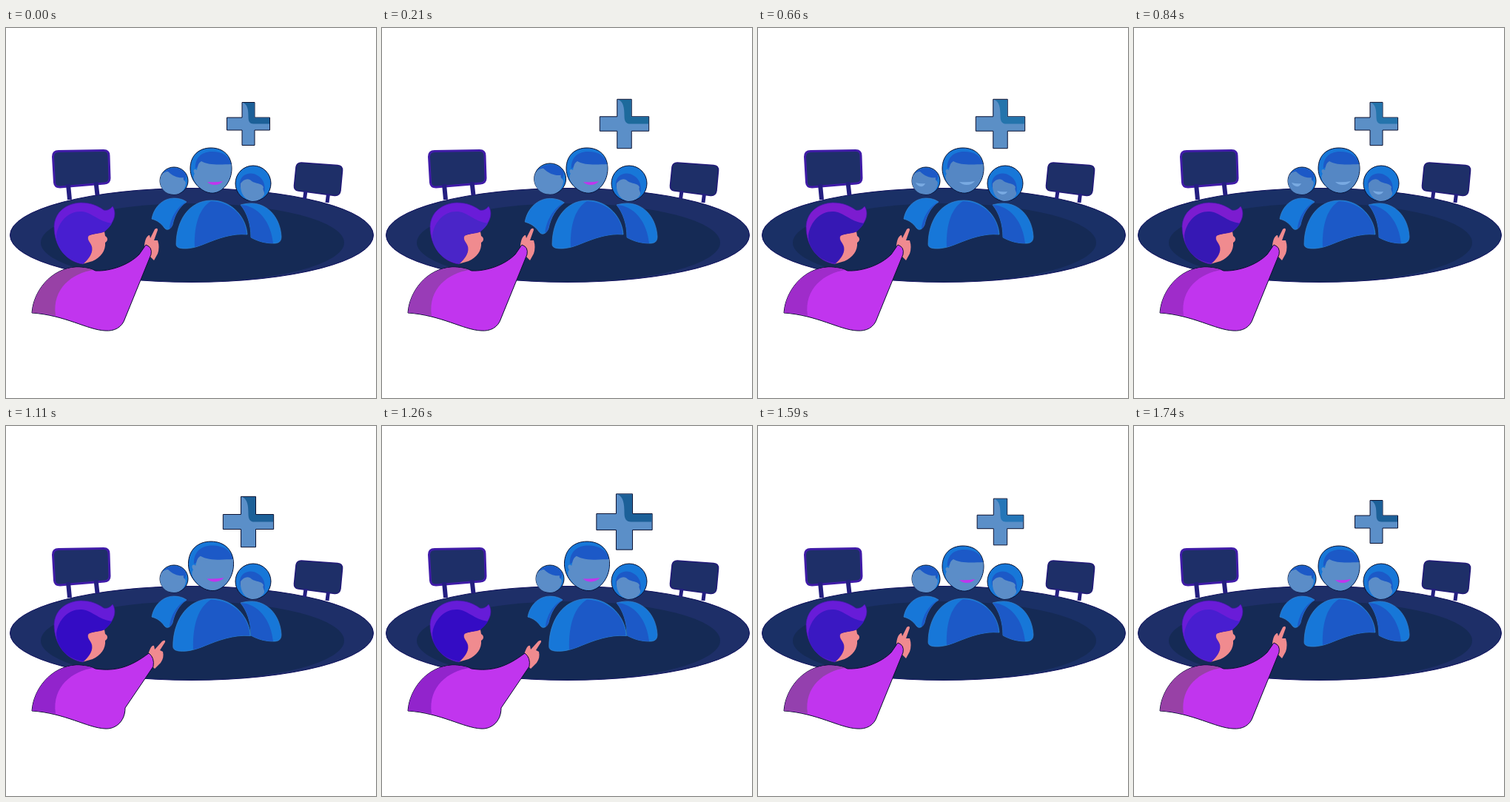
Recreate the animation shown at these times as an HTML page. Size 500 px wide and 500 px high, loop 1800 ms.

```html
<!DOCTYPE html>
<html lang="en">
<head>
<meta charset="utf-8">
<title>Team pointing loop</title>
<style>
html, body { margin: 0; width: 100%; height: 100%; overflow: hidden; background: #fff; }
svg { display: block; width: 100vw; height: 100vh; }
.edge { stroke: #0a1030; stroke-width: 1; vector-effect: non-scaling-stroke; }
.light { fill: #1777d8; }
.dark { fill: #1c59c7; }
.rim { stroke: #3488d4; stroke-width: .7; }
.face { fill: var(--face); }
.skin { fill: #f08b8f; }
.shirt { fill: #c135ee; }
.navy { fill: #1e2f68; }
.grin { fill: #79aae2; }
.board { stroke: #401ca8; stroke-width: 3; }
.leg { stroke: #241f80; stroke-width: 6; }
</style>
</head>
<body>
<svg viewBox="0 0 500 500">
  <ellipse cx="251" cy="280" rx="245.5" ry="63.5" fill="var(--table)" stroke="#0e0e5c"/>
  <ellipse cx="252" cy="290" rx="205" ry="53" fill="#152a55"/>

  <g>
    <path class="navy board" d="M71 166.500 L132 165.500 Q139 165.500 139 172.500 L140 203 Q140 209.500 133 210 L73 215 Q66 215 65.500 209 L63.500 174 Q63.500 166.500 71 166.500Z"/>
    <path class="leg" d="M84 211 L86 232 M121.500 208 L123.500 226"/>
    <path class="navy board" style="stroke:#221a78;stroke-width:1.600" d="M399 182 L448 185.500 Q455 186 454.500 193 L452 220 Q451 227 444 226.500 L395 220 Q389 219 389.500 213 L392 188 Q393 182 399 182Z"/>
    <path class="leg" style="stroke-width:5" d="M405 220 L403.500 231 M435.500 224 L434 236"/>
  </g>

  <g id="left">
    <path class="light rim" d="M197 258 C200 241 213 230 227 230 C234 230 240 232 244 235 C234 242 228 252 225 266 C222 273 217 274 214 270 C209 263 204 260 197 258Z"/>
    <path class="dark" d="M244 235 C234 242 228 252 225 266 C224 269 222 271 221 271 C222 257 232 240 244 235Z"/>
    <ellipse class="light edge" cx="227" cy="206.500" rx="19" ry="18.500"/>
    <path class="dark" d="M211 198 C218 187 236 186 243 198 C244 202 242 206 240 208 L216 201Z"/>
    <path class="face" d="M209 201 C211 196 215 194 219 194 C226 201 234 203 240 202 C239 206 242 206 243 209 C242 219 236 225 227 225 C215 225 208 216 208 206Z"/>
    <path class="grin kids" d="M213 209 Q220 211 226 210 Q224 215 219 214 Q215 213 213 209Z"/>
  </g>

  <g>
    <path class="light rim" d="M317 239 C325 237 333 236 340 238 C360 243 371 262 372 282 C372 289 368 291 362 291 C350 291 340 288 331 283 C331 265 326 250 317 239Z"/>
    <path class="dark" d="M317 239 C341 240 358 262 361 291 C350 291 340 288 331 283 C331 265 326 250 317 239Z"/>
    <ellipse class="light edge" cx="334" cy="210" rx="24" ry="24"/>
    <path class="dark" d="M316 214 C314 198 330 192 341 200 C349 205 351 214 349 225 L320 222Z"/>
    <path class="face" d="M317 210 C321 204 328 202 332 207 C338 211 345 209 348 215 C346 219 350 221 349 225 C346 231 340 234 333 234 C323 233 316 223 317 210Z"/>
    <path class="grin kids" d="M323 220 Q330 222 337 221 Q335 225 330 225 Q325 224 323 220Z"/>
  </g>

  <g id="middle">
    <path class="light rim" d="M230 292 C230 262 246 233 278 233 C307 233 325 258 326 279 C305 277 285 285 270 291 C258 296 250 298 242 298 C233 298 230 296 230 292Z"/>
    <path class="dark" d="M277 234 C262 243 254 264 255 296 C260 295 265 293 270 291 C285 285 305 277 325 279 C325 256 305 235 277 234Z"/>
    <path class="light edge" d="M249 190 C249 172 261 162 277 162 C294 162 305 173 305 190 C305 208 292 223 279 223 C265 223 249 208 249 190Z"/>
    <path class="dark" d="M256 190 C255 176 264 167 278 167 C294 167 303 174 304 186 L262 186Z"/>
    <path class="face" d="M304.500 184 C291 184.500 274 186 264 180 C259 183 259 188 258 192 C254 189 252 193 255 197 C253 199 253 203 255 207 C261 217 270 222.500 279 222.500 C292 222.500 304.500 207 304.500 190Z"/>
    <path id="smile" d="M272 208 Q283 209 293 207 Q289 212 282 212 Q276 212 272 208Z"/>
  </g>

  <g id="plus">
    <path class="edge" fill="var(--plus)" d="M-8.500-29H8.500V-8.500H29V8.500H8.500V29H-8.500V8.500H-29V-8.500H-8.500Z"/>
    <path fill="var(--shade)" d="M-7-28.500H8V-8H28.500V0H7C2 0 0-3 0-9C0-19-1-26-7-28.500Z"/>
  </g>

  <path id="hand" class="skin"/>
  <path id="torso" class="shirt edge"/>
  <path fill="var(--sleeve)" d="M35.500 385 C37 356 60 325 95 323.500 C106 323.500 113 325 118 327 C90 331 62 352 67 388.500 C55 386 45 385 35.500 385Z"/>
  <path class="skin" d="M133 275 L134 281 C138 283 138 288 134 290 C135 301 128 310 117 315 L103 319 L108 281Z"/>
  <path fill="var(--crown)" stroke="#4218a8" stroke-width=".7" d="M104 319 C82 316 65 296 65 268 C66 248 82 237 101 236 C114 236 124 240 132 246 C137 247 141 245 144 241 C150 250 147 263 133 275 C126 278 116 277 111 281 C108 288 117 291 116 300 C115 308 109 314 104 319Z"/>
  <path fill="var(--hair)" d="M104 318 C84 315 68 300 68 280 C71 260 86 247 102 248 C116 249 124 261 143 264 C141 268 138 271 133 275 C126 278 116 277 111 281 C108 288 117 291 116 300 C115 308 109 314 104 318Z"/>
</svg>
<script>
const LOOP = 1800, PULSE = 870;
const $ = id => document.getElementById(id);
const kids = document.querySelectorAll('.kids');

const back = 'M35 385 C37 356 60 325 95 323 C106 323 115 325 121 328 ';
const hem = ' 146 410 134 409 C110 408 80 388 35 385Z';
const raised = {
  torso: back + 'C140 329 165 321 180 306 L189 293 Q198 296 196 306 L161 392 C157 405' + hem,
  hand: 'M187 296 C187 288 190 280 194 280 L195 284 L201 272 Q205 269 205 273 L200 287 L205 287 Q208 296 205 305 L200 314 L194 308Z'
};
const lowered = {
  torso: back + 'C148 332 168 326 193 307 Q201 313 199 325 L161 381 C161 401' + hem,
  hand: 'M192 309 C195 300 197 296 200 297 L201 302 L211 291 Q216 288 215 292 L208 303 L212 305 Q214 313 209 320 L201 328 L196 323Z'
};

// Start time, then one colour per name
const names = ['sleeve', 'hair', 'crown', 'face', 'plus', 'shade', 'table'];
const tints = [
  [0, '#9841a6', '#481ed0', '#6a1cd8', '#5b8dc8', '#5b8fc8', '#1c6098', '#1e2f68'],
  [120, '#993cb7', '#4a25c8', '#6a1cd8', '#5b8dc8', '#5b8fc8', '#1d6a9c', '#1e2f68'],
  [330, '#853898', '#4420c8', '#6a1cdc', '#4f83bd', '#5ba5cc', '#20709a', '#1e2f68'],
  [660, '#9f2cca', '#3618b4', '#7c1cd0', '#5587c4', '#5b8fc6', '#2474ac', '#1a3066'],
  [990, '#9224cc', '#340cc4', '#661cd8', '#5b8dc8', '#5b8fc8', '#1c6098', '#1e2f68'],
  [1290, '#9440ae', '#3a18c2', '#681cd8', '#5b8dc8', '#5b8fc8', '#2476b8', '#1a3066'],
  [1620, '#9841a6', '#481ed0', '#6a1cd8', '#5b8dc8', '#5b8fc8', '#1c6098', '#1e2f68']
];

const ramp = (t, start) => {
  const k = Math.min(1, Math.max(0, (t - start) / 90));
  return k * k * (3 - 2 * k);
};
const swell = (id, x, y, gain, k) =>
  $(id).setAttribute('transform', `translate(${x} ${y}) scale(${1 + gain * k}) translate(${-x} ${-y})`);

function draw(now) {
  const t = Math.floor(now % LOOP / 30) * 30;

  const turn = Math.min(t, 2 * PULSE) / PULSE;
  const size = 1 + .153 * (1 - Math.cos(turn * 2 * Math.PI));
  $('plus').setAttribute('transform', `translate(327.5 129.500) scale(${size})`);

  swell('left', 226, 227, .13, ramp(t, 60) - ramp(t, 570));
  swell('middle', 277, 228, .09, ramp(t, 930) - ramp(t, 1260));

  const pose = t >= 960 && t < 1590 ? lowered : raised;
  $('torso').setAttribute('d', pose.torso);
  $('hand').setAttribute('d', pose.hand);

  const grinning = t >= 330 && t < 990;
  kids.forEach(k => k.style.display = grinning ? '' : 'none');
  $('smile').setAttribute('fill', t >= 660 && t < 990 ? '#79aae2' : '#c135ee');

  const tint = tints.filter(row => row[0] <= t).pop();
  names.forEach((n, i) => document.body.style.setProperty('--' + n, tint[i + 1]));
}

const start = performance.now();
function tick() {
  draw(performance.now() - start);
  requestAnimationFrame(tick);
}
tick();
</script>
</body>
</html>
```
